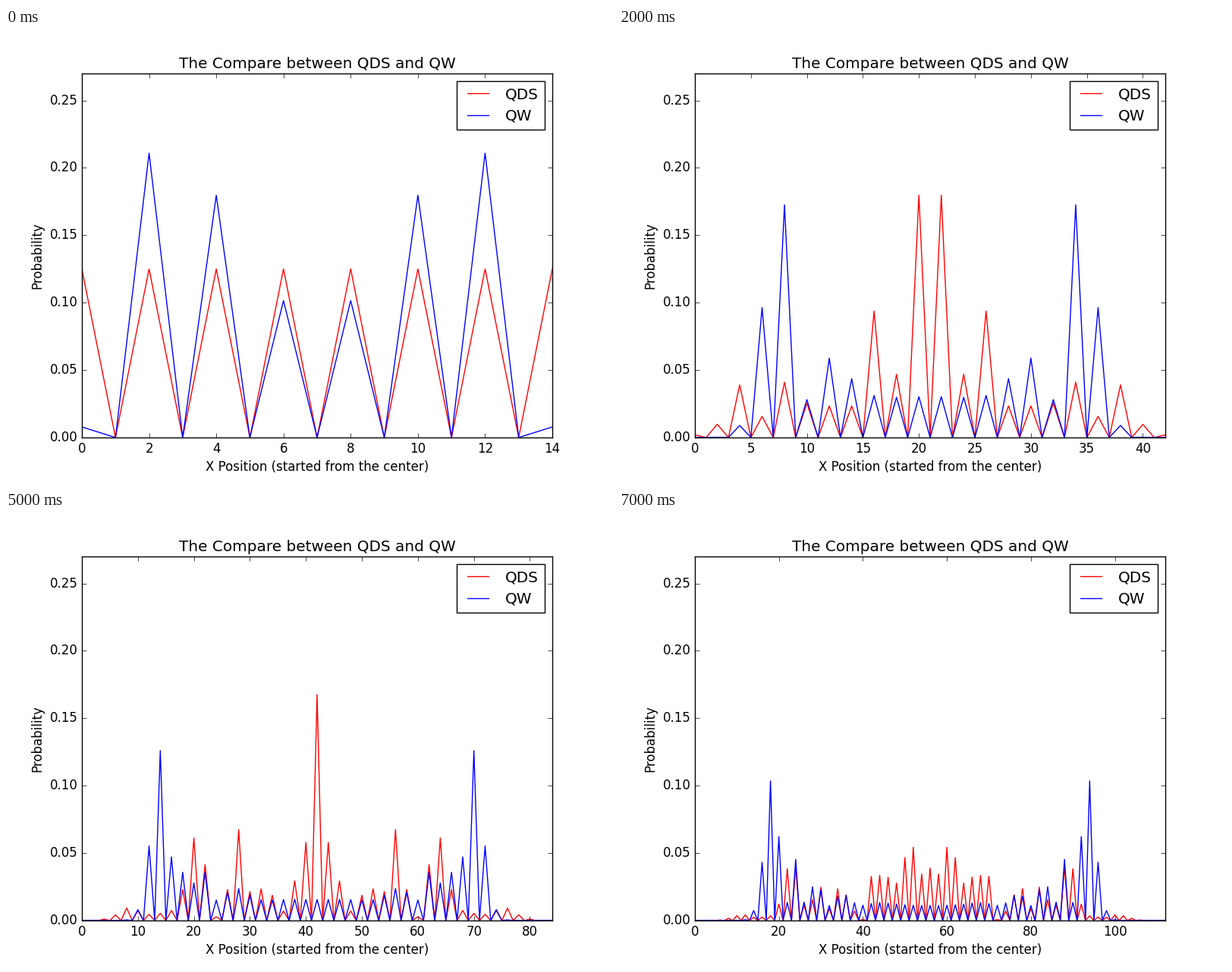
Write a matplotlib script that moves like this. It is 800 px wide and 600 px high and loops after 8 s.

```python
import numpy as np
import matplotlib.pyplot as plt
from matplotlib.animation import FuncAnimation
from matplotlib.ticker import MaxNLocator

plt.style.use("classic")
plt.rcParams.update({
    "font.family": "DejaVu Sans",
    "figure.facecolor": "white",
    "savefig.facecolor": "white",
    "savefig.dpi": "figure",
})

ROUNDS = 8
REACH = 7                  # distance covered in one round
CENTER = ROUNDS * REACH
HADAMARD = np.array([[1, 1], [1, -1]]) / np.sqrt(2)


def walk(shifts):
    """Probabilities after each round of Hadamard-coin moves."""
    state = np.zeros((2, 2 * CENTER + 1), complex)
    state[:, CENTER] = np.array([1, 1j]) / np.sqrt(2)
    result = []
    for k in range(1, ROUNDS + 1):
        for d in shifts:
            left, right = HADAMARD @ state
            state = np.array([np.roll(left, -d), np.roll(right, d)])
        prob = (np.abs(state) ** 2).sum(axis=0)
        n = k * REACH
        result.append(prob[CENTER - n:CENTER + n + 1])
    return result


qds = walk([1, 2, 4])
qw = walk([1] * REACH)

fig, ax = plt.subplots(figsize=(8, 6), dpi=100)
fig.subplots_adjust(left=0.125, right=0.9, bottom=0.1, top=0.9)
red, = ax.plot([], [], "r-", lw=1, label="QDS")
blue, = ax.plot([], [], "b-", lw=1, label="QW")
ax.set_ylim(0, 0.27)
for axis in (ax.xaxis, ax.yaxis):
    axis.set_major_locator(MaxNLocator(9, steps=[1, 2, 5, 10]))
ax.set_title("The Compare between QDS and QW")
ax.set_xlabel("X Position (started from the center)")
ax.set_ylabel("Probability")
ax.legend(loc="upper right")


def update(k):
    x = np.arange(len(qw[k]))
    red.set_data(x, qds[k])
    blue.set_data(x, qw[k])
    ax.set_xlim(0, x[-1])
    return red, blue


anim = FuncAnimation(fig, update, frames=ROUNDS, interval=1000,
                     init_func=lambda: update(0), repeat=True, repeat_delay=0)
plt.show()
```
